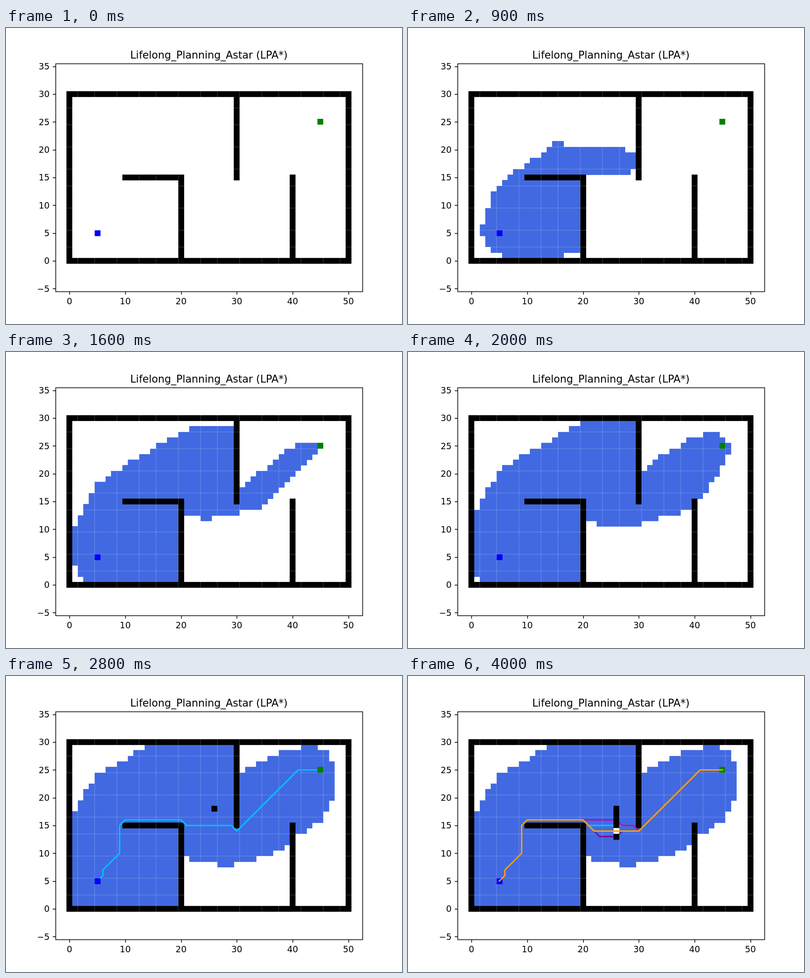
An HTML page with a canvas that plays this animation: 800x600 px, repeating every 4100 ms.

```html
<!DOCTYPE html>
<html lang="en">
<head>
<meta charset="utf-8">
<title>Grid search</title>
<style>
html, body { margin: 0; width: 100%; height: 100%; overflow: hidden; background: #fff; }
canvas { display: block; }
</style>
</head>
<body>
<canvas id="stage" width="800" height="600"></canvas>
<script>
const ctx = document.getElementById('stage').getContext('2d');
const LOOP = 4100, UNIT = 124 / 11;
const START = [5, 5], GOAL = [45, 25];
const CELLS_PER_STEP = 40, CELLS_TOTAL = 945, REPLAN_STEP = 25;
const px = x => 410 + (x - 25) * UNIT;
const py = y => 303 - (y - 15) * UNIT;
const key = (x, y) => x * 100 + y;

const walls = new Map();
function addWall(x0, y0, x1, y1) {
  for (let x = x0; x <= x1; x++)
    for (let y = y0; y <= y1; y++) walls.set(key(x, y), [x, y]);
}
addWall(0, 0, 50, 0);
addWall(0, 30, 50, 30);
addWall(0, 0, 0, 30);
addWall(50, 0, 50, 30);
addWall(10, 15, 20, 15);
addWall(20, 0, 20, 15);
addWall(30, 15, 30, 30);
addWall(40, 0, 40, 15);

// Order in which A* expands the free cells: by cost so far plus straight distance to the goal.
function expansionOrder() {
  const cost = new Map([[key(...START), 0]]);
  const queue = [START];
  for (const [x, y] of queue) {
    const base = cost.get(key(x, y));
    for (let dx = -1; dx <= 1; dx++) {
      for (let dy = -1; dy <= 1; dy++) {
        const k = key(x + dx, y + dy), g = base + Math.hypot(dx, dy);
        if (walls.has(k) || g >= (cost.get(k) ?? Infinity) - 1e-9) continue;
        cost.set(k, g);
        queue.push([x + dx, y + dy]);
      }
    }
  }
  return [...cost].map(([k, g]) => {
    const x = Math.floor(k / 100), y = k % 100;
    return { x, y, g, f: g + Math.hypot(GOAL[0] - x, GOAL[1] - y) };
  }).sort((a, b) => Math.abs(a.f - b.f) > 1e-9 ? a.f - b.f : a.g - b.g);
}
const visited = expansionOrder().slice(0, CELLS_TOTAL);

// Routes differ only between the two wall corners.
const HEAD = [START, [6, 6], [6, 7], [9, 10], [9, 15], [10, 16], [20, 16]];
const TAIL = [[30, 14], [41, 25], GOAL];
const direct = [[21, 15], [29, 15]];
const upper = [[26, 16], [27, 15], [29, 15]];
const lower = [[23, 13], [26, 13], [27, 14]];
const middle = [[22, 14]];

function cell(x, y, color) {
  ctx.fillStyle = color;
  ctx.fillRect(Math.round(px(x)) - 5.87, Math.round(py(y)) - 5.87, 11.74, 11.74);
}
function route(via, color) {
  ctx.beginPath();
  for (const [x, y] of [...HEAD, ...via, ...TAIL]) ctx.lineTo(px(x), py(y));
  ctx.strokeStyle = color;
  ctx.lineWidth = 2.6;
  ctx.lineCap = 'square';
  ctx.lineJoin = 'round';
  ctx.stroke();
}
function endpoints() {
  cell(...START, '#00f');
  cell(...GOAL, '#008000');
}
const path = (via, color) => () => { route(via, color); endpoints(); };
const gate = (y, color = '#000') => () => cell(26, y, color);

const events = [
  path(direct, 'deepskyblue'),
  gate(18), path(direct, 'deepskyblue'),
  gate(17), path(direct, 'deepskyblue'),
  gate(15), path(upper, 'red'),
  gate(14), path(upper, '#bf00bf'),
  gate(16), path(lower, 'purple'),
  gate(14, '#fff'), path(middle, 'orange'),
  gate(13), () => route(middle, 'orange')
];

function drawAxes() {
  ctx.strokeStyle = ctx.fillStyle = '#000';
  ctx.lineWidth = 1.39;
  ctx.lineCap = 'butt';
  ctx.lineJoin = 'miter';
  ctx.strokeRect(100.5, 72.5, 620, 462);
  ctx.font = '17.36px "DejaVu Sans", sans-serif';
  ctx.beginPath();
  ctx.textAlign = 'center';
  for (let v = 0; v <= 50; v += 10) {
    const x = Math.round(px(v)) + 0.5;
    ctx.moveTo(x, 534.5);
    ctx.lineTo(x, 540.5);
    ctx.fillText(v, px(v), 560);
  }
  ctx.textAlign = 'right';
  for (let v = -5; v <= 35; v += 5) {
    const y = Math.round(py(v)) + 0.5;
    ctx.moveTo(100.5, y);
    ctx.lineTo(94.5, y);
    ctx.fillText(String(v).replace('-', '\u2212'), 88, Math.round(py(v) + 6.4));
  }
  ctx.stroke();
  ctx.textAlign = 'center';
  ctx.font = '20.83px "DejaVu Sans", sans-serif';
  ctx.fillText('Lifelong_Planning_Astar (LPA*)', 410, 62);
}

function draw(time) {
  const step = Math.max(0, Math.floor(time % LOOP / 100) - 1);
  ctx.fillStyle = '#fff';
  ctx.fillRect(0, 0, 800, 600);
  const count = step && step * CELLS_PER_STEP + 1;
  for (const { x, y } of visited.slice(0, count)) cell(x, y, 'royalblue');
  for (const [x, y] of walls.values()) cell(x, y, '#000');
  endpoints();
  for (const event of events.slice(0, Math.max(0, step - REPLAN_STEP + 1))) event();
  drawAxes();
}

const begin = performance.now();
function tick() {
  draw(performance.now() - begin);
  requestAnimationFrame(tick);
}
tick();
</script>
</body>
</html>
```
